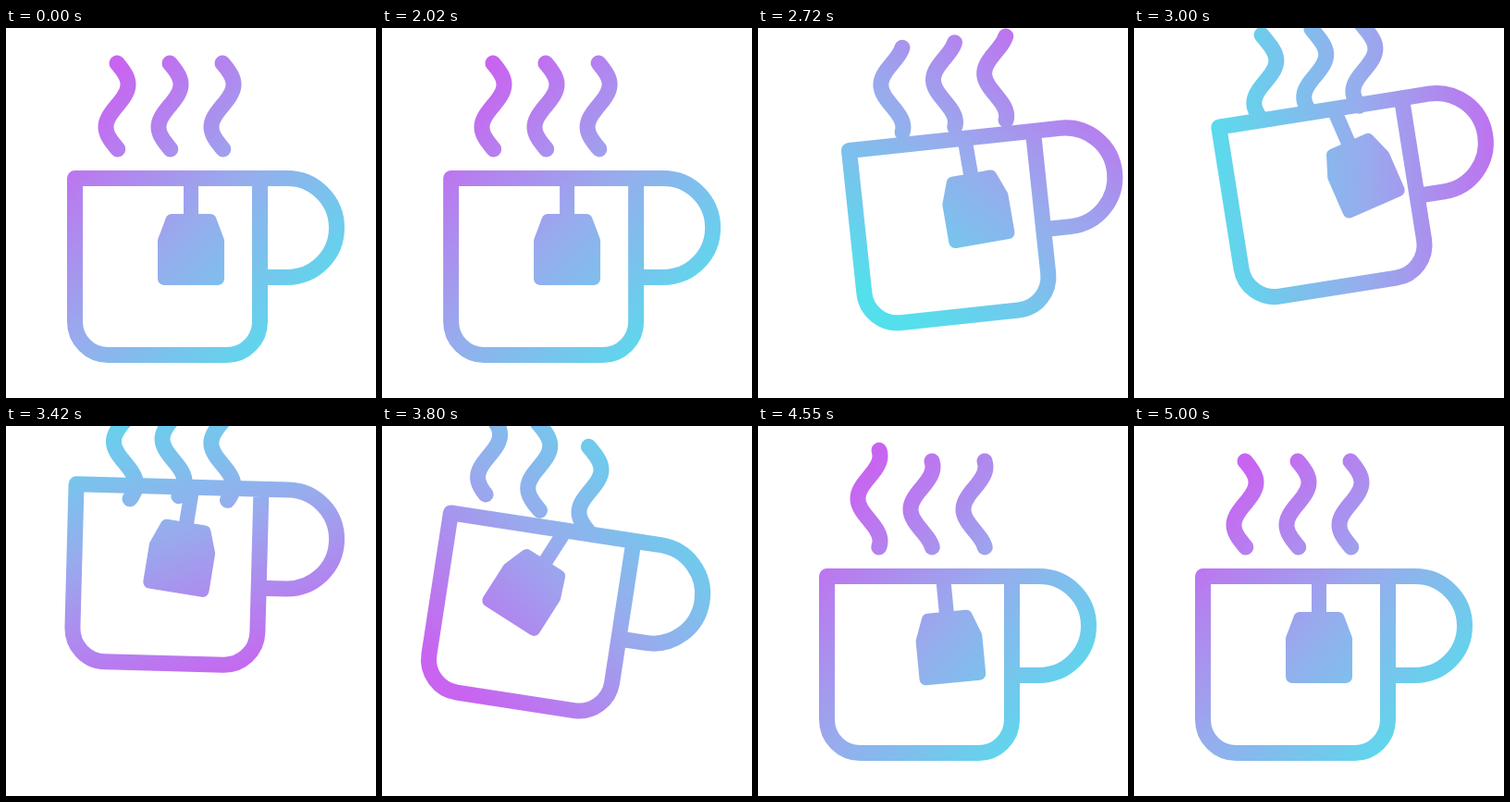
An HTML page with a canvas that plays this animation: 400x400 px, repeating every 5.2 s.

```html
<!DOCTYPE html>
<html lang="en">
<head>
<meta charset="utf-8">
<title>Tea cup</title>
<style>
html, body { margin: 0; width: 100%; height: 100%; overflow: hidden; background: #fff; }
canvas { display: block; width: 400px; height: 400px; }
</style>
</head>
<body>
<canvas id="stage" width="400" height="400"></canvas>
<script>
const ctx = document.getElementById('stage').getContext('2d');
const LOOP = 5200;
const RAD = Math.PI / 180;
const SIZE = 400;
const WAVE = 92;

// Smooth monotone curve through [time, value] keys, flat at both ends.
function track(...keys) {
  const last = keys.length - 1;
  const rate = i => (keys[i + 1][1] - keys[i][1]) / (keys[i + 1][0] - keys[i][0]);
  const slope = keys.map((k, i) => {
    if (i === 0 || i === last) return 0;
    const a = rate(i - 1), b = rate(i);
    return a * b <= 0 ? 0 : 2 * a * b / (a + b);
  });
  return t => {
    if (t <= keys[0][0]) return keys[0][1];
    if (t >= keys[last][0]) return keys[last][1];
    let i = 0;
    while (t > keys[i + 1][0]) i++;
    const h = keys[i + 1][0] - keys[i][0];
    const u = (t - keys[i][0]) / h, v = 1 - u;
    return keys[i][1] * v * v * (1 + 2 * u) + slope[i] * h * u * v * v
         + keys[i + 1][1] * u * u * (3 - 2 * u) - slope[i + 1] * h * u * u * v;
  };
}

const cupX = track([2000, 0], [2550, 34], [3000, 31], [3700, -17], [4300, 0]);
const cupY = track([2150, 0], [3420, -97], [4250, 0]);
const cupTilt = track([2200, 0], [3050, -9.1], [3720, 9.2], [4300, 0]);
const bagTilt = track([2000, 0], [2400, 7], [3000, -23.5], [3760, 33], [4450, -6], [5000, 0]);
const hueTurn = track([2100, 45], [3000, 178], [3800, 316], [4650, 405]);
const phase = track([2000, 0], [3000, 1.05], [3800, 2.02], [4200, 2.54], [5000, 3]);
const sway = track([2000, 0], [2500, 25], [3900, -9.5], [4300, 0]);

// The rightmost wisp leads; each one to its left lags and sinks more slowly.
const wisps = [0, 1, 2].map(lag => {
  const lift = (height, fall) =>
    track([2000 + 60 * lag, 0], [3300 + 220 * lag, -height - 2 * lag], [4100 + fall * lag, 0]);
  const top = lift(50, 400), end = lift(54, 210);
  return {
    x: t => 234 - 57 * lag + sway(t - 120 * lag),
    top: t => 38 + top(t),
    end: t => 131 + end(t)
  };
});

function drawWisp(wisp, t) {
  const x = wisp.x(t), top = wisp.top(t), length = wisp.end(t) - top;
  const shift = phase(t), steps = 48;
  ctx.beginPath();
  for (let i = 0; i <= steps; i++) {
    const u = length * i / steps;
    ctx.lineTo(x + 12 * Math.sin(2 * Math.PI * (u / WAVE - shift)), top + u);
  }
  ctx.stroke();
}

function drawCup() {
  ctx.beginPath();
  ctx.moveTo(74.5, 162.5);
  ctx.arcTo(74.5, 353.5, 274.5, 353.5, 36);
  ctx.arcTo(274.5, 353.5, 274.5, 162.5, 36);
  ctx.lineTo(274.5, 162.5);
  ctx.closePath();
  ctx.moveTo(274.5, 162.5);
  ctx.lineTo(304, 162.5);
  ctx.arc(304, 216, 53.5, -Math.PI / 2, Math.PI / 2);
  ctx.lineTo(274.5, 269.5);
  ctx.stroke();
}

function drawBag() {
  const pts = [[225.5, 201], [236, 229], [236, 278], [164, 278], [164, 229], [174.5, 201]];
  ctx.fillRect(192, 162, 16, 44);
  ctx.beginPath();
  ctx.moveTo(200, 201);
  pts.forEach((p, i) => ctx.arcTo(...p, ...pts[(i + 1) % pts.length], 7));
  ctx.closePath();
  ctx.fill();
}

function rotateAbout(x, y, deg) {
  ctx.translate(x, y);
  ctx.rotate(deg * RAD);
  ctx.translate(-x, -y);
}

function fillStage(mode, style) {
  ctx.globalCompositeOperation = mode;
  ctx.fillStyle = style;
  ctx.fillRect(0, 0, SIZE, SIZE);
}

// A turning gradient that travels with the cup.
function gradient(t) {
  const a = hueTurn(t) * RAD, reach = 178;
  const x = 216 + cupX(t), y = 200 + cupY(t);
  const dx = reach * Math.cos(a), dy = reach * Math.sin(a);
  const g = ctx.createLinearGradient(x - dx, y - dy, x + dx, y + dy);
  g.addColorStop(0, 'rgb(200,100,240)');
  g.addColorStop(0.5, 'rgb(151,172,237)');
  g.addColorStop(1, 'rgb(84,223,236)');
  return g;
}

function draw(t) {
  ctx.globalCompositeOperation = 'source-over';
  ctx.clearRect(0, 0, SIZE, SIZE);
  ctx.fillStyle = ctx.strokeStyle = '#000';
  ctx.lineWidth = 17;
  ctx.lineCap = ctx.lineJoin = 'round';
  wisps.forEach(w => drawWisp(w, t));

  ctx.save();
  ctx.translate(cupX(t), cupY(t));
  rotateAbout(175, 258, cupTilt(t));
  drawCup();
  // The bag's swing is measured against the upright, not the cup.
  rotateAbout(200, 162, bagTilt(t) - cupTilt(t));
  drawBag();
  ctx.restore();

  fillStage('source-in', gradient(t));
  fillStage('destination-over', '#fff');
}

const start = performance.now();
function frame() {
  draw((performance.now() - start) % LOOP);
  requestAnimationFrame(frame);
}
frame();
</script>
</body>
</html>
```
